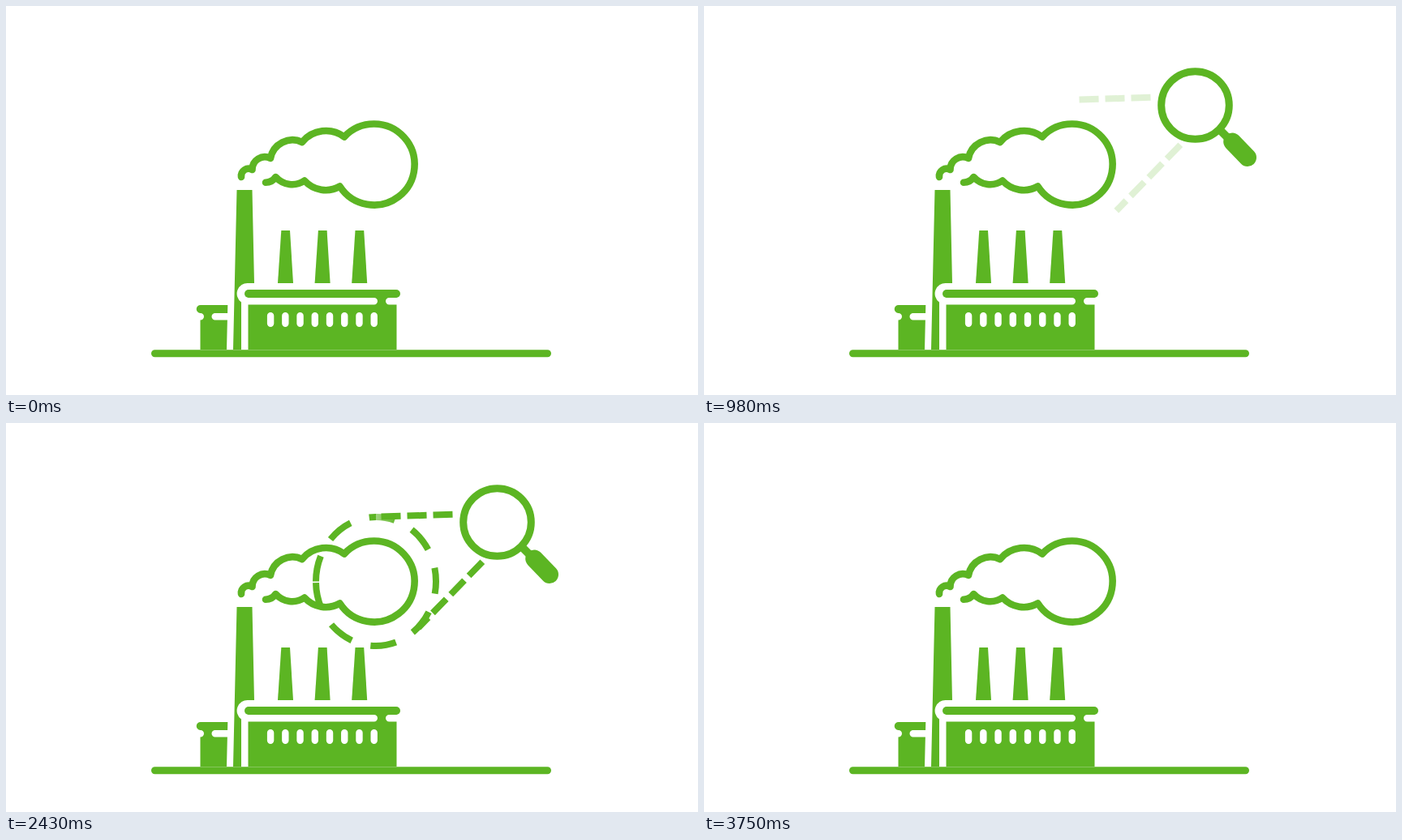
An HTML page for the animation above (4010 ms loop, 853x480 px).

```html
<!DOCTYPE html>
<html lang="en">
<head>
<meta charset="utf-8">
<title>Factory emissions</title>
<style>
  html, body { margin: 0; width: 100%; height: 100%; overflow: hidden; background: #fff; }
  svg { position: absolute; left: 0; top: 0; width: 853px; height: 480px; }
  .fill { fill: #5cb523; }
  .line { fill: none; stroke: #5cb523; }
  .gap { fill: none; stroke: #fff; stroke-width: 8.4; stroke-linecap: round; }
  .round { stroke-linecap: round; stroke-linejoin: round; }
</style>
</head>
<body>
<svg viewBox="0 0 853 480">
  <!-- annex -->
  <path class="fill" d="M240 369H273.3L272 423.9H239.5V379A5 5 0 0 1 240 369Z"/>
  <path class="gap" d="M230 383.2H239.8M257.7 383.2H274"/>

  <!-- chimneys -->
  <path class="fill" d="M284.5 227H303.5L306 342H298.5A13 13 0 0 0 290 365.5V423.9H280Z"/>
  <g id="stacks" class="fill"></g>

  <!-- main hall -->
  <path class="fill" d="M298.5 358H481.5V423.9H298.5Z"/>
  <path class="gap" d="M296 364.2H453.8M472.2 364.2H490"/>
  <path class="line round" stroke-width="10" d="M299 355H481"/>
  <path id="windows" class="gap"/>

  <path class="line round" stroke-width="9" d="M183.5 428.7H667.5"/>

  <!-- smoke -->
  <path class="line round" stroke-width="8.6" d="M290 211A9 9 0 0 1 303.5 202A15.5 15.5 0 0 1 326 188
    A27.5 27.5 0 0 1 365 168A38 38 0 0 1 417 161.5A50 50 0 1 1 411.5 222.5
    A35 35 0 0 1 368 215.5A27 27 0 0 1 332.5 211A15 15 0 0 1 320 217.7"/>

  <path id="rays" class="line" stroke-width="8" stroke-dasharray="24 8"
    d="M550.5 112.8L456 115.8M587.3 171.3L508.3 252.6"/>

  <g id="lens">
    <circle class="line" stroke-width="9" cx="605.5" cy="122.5" r="41.8"/>
    <path class="line" stroke-width="10" d="M634 151L650 167"/>
    <path class="line round" stroke-width="22" d="M651.2 167.5L670 187"/>
  </g>
</svg>
<svg id="ring" viewBox="0 0 853 480">
  <path class="line" stroke-width="8" stroke-dasharray="32 24"
    d="M382 195.5A74 79.5 0 0 1 530 195.5A74 79.5 0 0 1 382 195.5"/>
</svg>
<script>
const LOOP = 4010, STEP = 60, SOFT = 48;
const $ = id => document.getElementById(id);

$('stacks').innerHTML = [0, 1, 2].map(i =>
  `<path transform="translate(${i * 45.6})" d="M339.3 277H350L354 342H335Z"/>`).join('');
$('windows').setAttribute('d', Array.from({ length: 8 }, (_, i) =>
  `M${326.1 + i * 18.23} 382.2V391.8`).join(''));

const progress = (t, start, length) => Math.min(1, Math.max(0, (t - start) / length));
const easeInOut = p => p < 0.5 ? 2 * p * p : 1 - 2 * (1 - p) ** 2;

// The motion advances in 60 ms steps within two active spans.
function stepped(t) {
  const snap = (start, end) => Math.min(end, start + Math.floor((t - start) / STEP) * STEP);
  return t < 260 ? 0 : t < 2430 ? snap(260, 1760) : snap(2430, 3750);
}

// Clockwise wipe with a soft edge, starting at twelve o'clock.
function wipe(shown, hidden) {
  const front = (shown < 1 ? shown : hidden) * (360 + SOFT);
  const [before, after] = shown < 1 ? ['#000', 'transparent'] : ['transparent', '#000'];
  const mask = `conic-gradient(at 456px 195.5px, ${before} ${front - SOFT}deg, ${after} ${front}deg)`;
  const ring = $('ring').style;
  ring.visibility = shown > 0 && hidden < 1 ? 'visible' : 'hidden';
  ring.webkitMaskImage = ring.maskImage = shown === 1 && hidden === 0 ? 'none' : mask;
}

function draw(time) {
  const t = stepped(time % LOOP);
  const offset = 310 * (1 - easeInOut(progress(t, 108, 760)) + easeInOut(progress(t, 3092, 760)));
  $('lens').setAttribute('transform', `translate(${offset})`);
  $('rays').style.opacity = progress(t, 868, 590) - progress(t, 2495, 590);
  wipe(progress(t, 1170, 585), progress(t, 2400, 600));
}

const begin = performance.now();
function tick() {
  draw(performance.now() - begin);
  requestAnimationFrame(tick);
}
tick();
</script>
</body>
</html>
```
